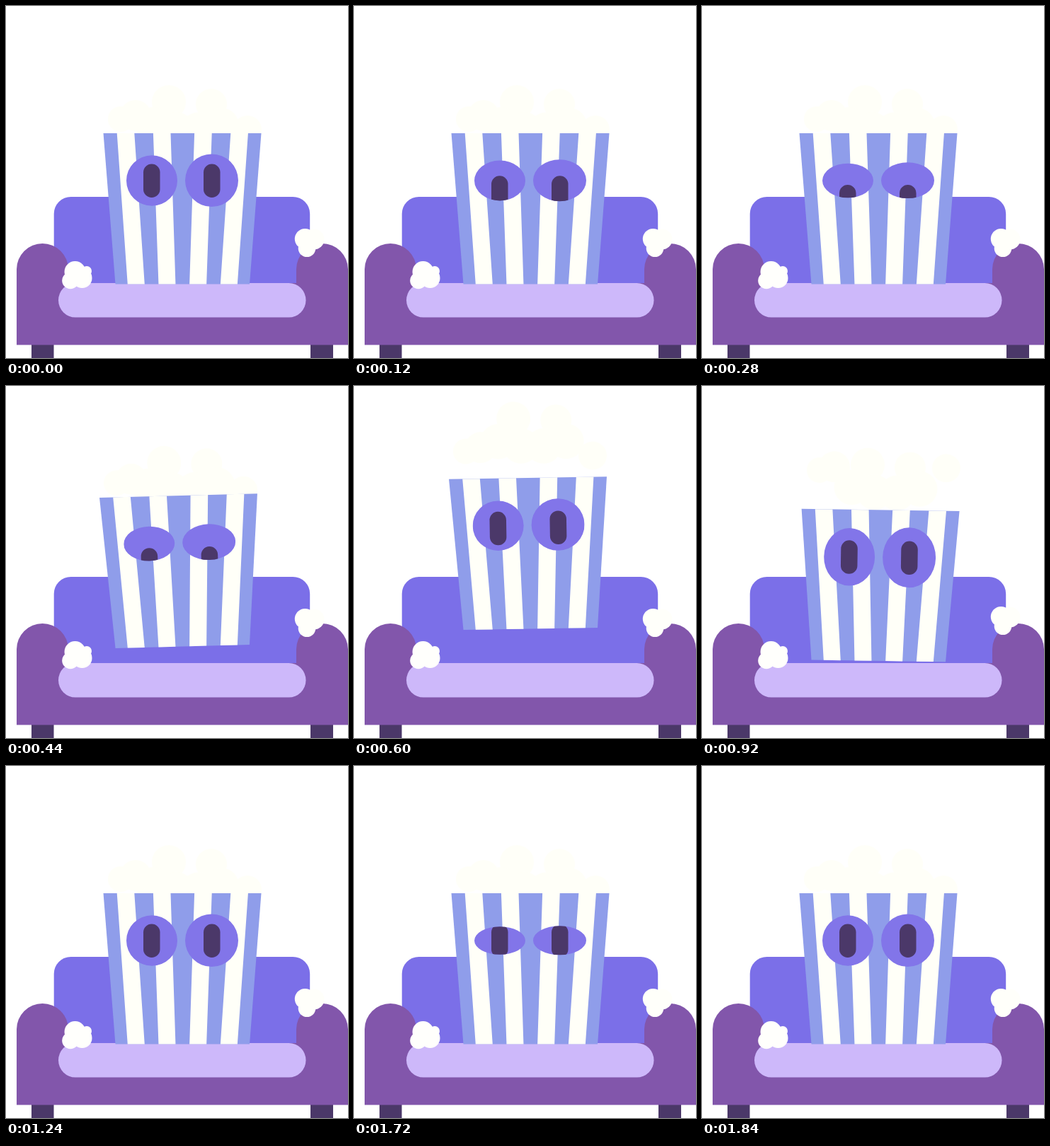
Recreate the animation shown at these times as an HTML page. Size 483x498 px, loop 2040 ms.

```html
<!DOCTYPE html>
<html lang="en">
<head>
<meta charset="utf-8">
<title>Jumping popcorn</title>
<style>
  html, body { margin: 0; width: 100%; height: 100%; overflow: hidden; background: #fff; }
  svg { display: block; width: 100%; height: 100%; }
</style>
</head>
<body>
<svg viewBox="0 0 483 498" preserveAspectRatio="xMinYMin meet">
  <rect x="67.7" y="270" width="361.5" height="150" rx="24" fill="#7b6fe8"/>
  <g fill="#4b3869">
    <rect x="36" y="470" width="31.5" height="28"/>
    <rect x="430" y="470" width="32" height="28"/>
  </g>
  <path fill="#8256ab" d="M15 479.5V372.5a36.5 36.5 0 0 1 73 0V392H410V372.5a36.5 36.5 0 0 1 73 0V479.5Z"/>
  <rect x="74" y="392" width="349.5" height="48.5" rx="24.2" fill="#cdb8fa"/>

  <g id="bucket" fill="#fffff8">
    <g id="corn">
      <circle cx="230" cy="136" r="24"/>
      <circle cx="290" cy="139" r="22"/>
    </g>
    <g id="cornLeft">
      <circle cx="162" cy="160" r="18"/>
      <circle cx="183" cy="155" r="22"/>
    </g>
    <g id="cornRight">
      <circle cx="341" cy="175" r="20"/>
    </g>
    <path fill="#8f9dea" d="M137.5 180H360.5L344 393.5H154.5Z"/>
    <path id="stripes"/>
    <clipPath id="eyes">
      <ellipse cx="206" cy="247" rx="36"/>
      <ellipse cx="290.5" cy="246.7" rx="37.5"/>
    </clipPath>
    <g clip-path="url(#eyes)">
      <rect x="165" y="190" width="170" height="110" fill="#8275e9"/>
      <g id="pupils" fill="#4b3869">
        <rect x="194" y="223.5" width="23.5" height="47.5" rx="11.75"/>
        <rect x="279" y="223.5" width="23.5" height="47.5" rx="11.75"/>
      </g>
    </g>
  </g>

  <g id="crumbLeft" fill="#fffffc">
    <circle cx="97.5" cy="376" r="15"/>
    <circle cx="91" cy="388.5" r="11.8"/>
    <circle cx="107.5" cy="385" r="14"/>
    <circle cx="114" cy="375" r="7"/>
  </g>
  <g id="crumbRight" fill="#fffffa">
    <circle cx="422.3" cy="329.6" r="14.5"/>
    <circle cx="425" cy="342.7" r="12.3"/>
    <circle cx="435" cy="330" r="14.5"/>
  </g>
</svg>
<script>
const LOOP = 2040, STEP = 40, MID = 249.3;
const el = id => document.getElementById(id);
const move = (id, y) => el(id).setAttribute('transform', `translate(0 ${y})`);

// Lower row of the popcorn heap
for (let i = 0; i < 4; i++) {
  el('corn').innerHTML += `<circle cx="${208 + 32 * i}" cy="${168 + 8 * Math.sin(i)}" r="25"/>`;
}

// Light stripes fan out towards the rim
let stripes = '';
for (let k = -1.5; k < 2; k++) {
  const top = MID + 51.2 * k + 3.5 * Math.sign(k), bottom = MID + 43.7 * k;
  stripes += `M${top - 12.3} 180h24.6L${bottom + 12} 393.5h-24Z`;
}
el('stripes').setAttribute('d', stripes);

function draw(t) {
  // Smooth step from 0 to 1; swell goes up and comes back
  const ramp = (from, to) => {
    const x = Math.min(1, Math.max(0, (t - from) / (to - from)));
    return x * x * (3 - 2 * x);
  };
  const swell = (a, b, c, d) => ramp(a, b) - ramp(c, d);
  const hop = (from, to) => {
    const x = Math.min(1, Math.max(0, (t - from) / (to - from)));
    return -6 * Math.sin(Math.PI * x);
  };

  const lift = -50 * swell(280, 600, 710, 968);
  const tilt = 2.1 * swell(520, 760, 760, 1040) - 2 * swell(280, 520, 520, 760);
  el('bucket').setAttribute('transform', `translate(0 ${lift}) rotate(${tilt} ${MID} 393.5)`);

  move('corn', -50 * swell(400, 680, 760, 1040));
  move('cornLeft', -38 * swell(440, 760, 880, 1120));
  move('cornRight', -60 * swell(440, 800, 880, 1120));

  const squint = swell(0, 200, 460, 700), stare = swell(460, 700, 860, 1080);
  const blink = swell(1680, 1760, 1760, 1840);
  const open = 1 - 0.32 * squint + 0.17 * stare - 0.9 * blink;
  for (const lid of el('eyes').children) {
    lid.setAttribute('ry', (lid.getAttribute('rx') - 0.2) * open);
  }
  move('pupils', 29.5 * swell(0, 220, 460, 680) - 7.5 * swell(460, 680, 760, 920));

  move('crumbLeft', hop(940, 1240));
  move('crumbRight', hop(880, 1120));
}

const start = performance.now();
function tick() {
  const t = (performance.now() - start) % LOOP;
  draw(Math.floor(t / STEP) * STEP);
  requestAnimationFrame(tick);
}
tick();
</script>
</body>
</html>
```
